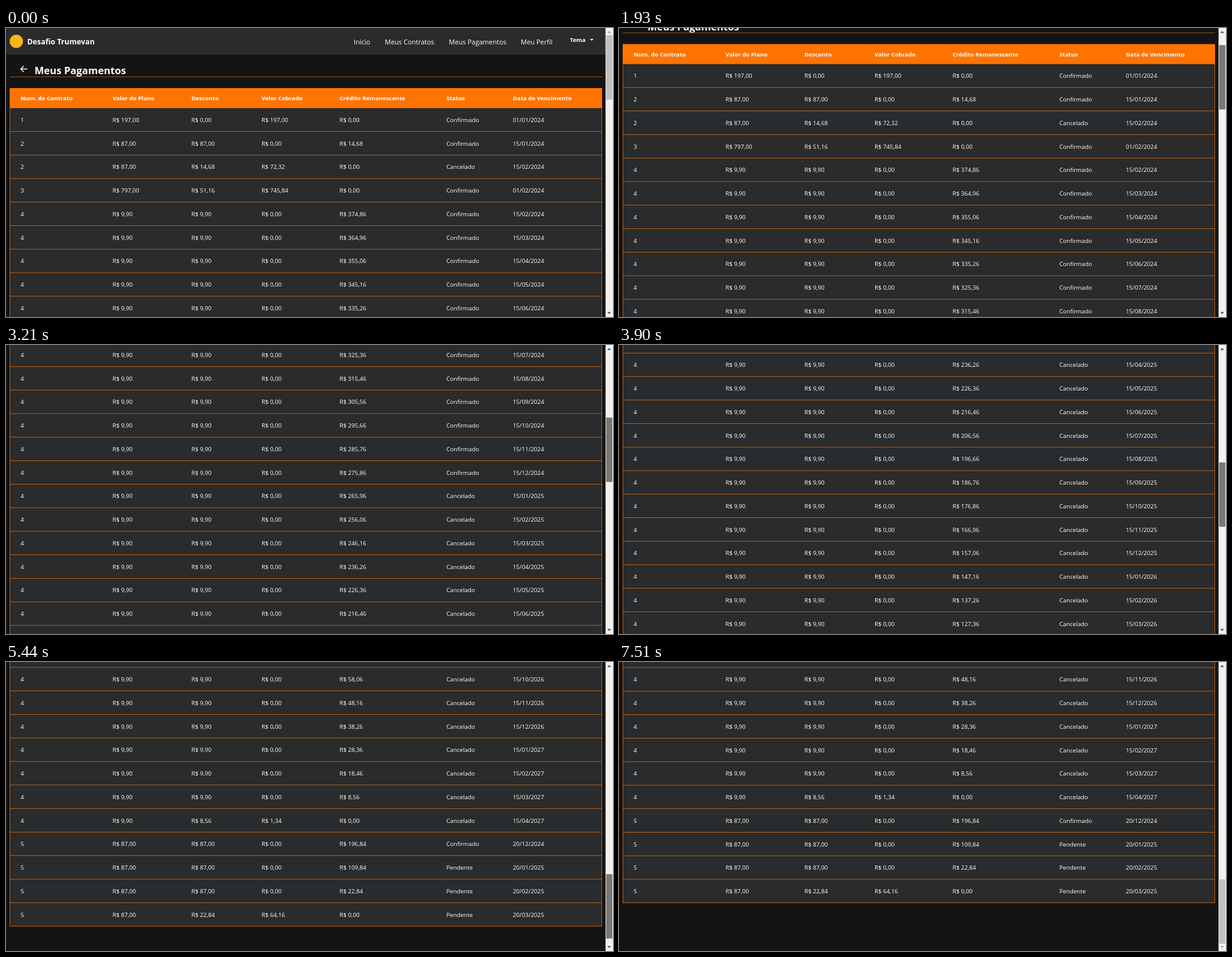
These frames come from a looping animation (1000 px wide and 476 px high, 7.53 s). An HTML page with a canvas:

```html
<!DOCTYPE html>
<html lang="pt-BR">
<head>
<meta charset="utf-8">
<title>Meus Pagamentos</title>
<style>
  html, body { margin: 0; width: 100%; height: 100%; overflow: hidden; background: #141414; }
  canvas { display: block; }
</style>
</head>
<body>
<canvas id="stage" width="1000" height="476"></canvas>
<script>
const ctx = document.getElementById('stage').getContext('2d');
const W = 1000, H = 476, LOOP = 7530, MAX_SCROLL = 1556.3;
const TABLE = { left: 6, right: 982, top: 99, body: 132, row: 38.75 };
const COLS = [24, 175.5, 305.5, 421, 549.5, 725.5, 835];
const HEADS = ['Num. do Contrato', 'Valor do Plano', 'Desconto', 'Valor Cobrado',
  'Crédito Remanescente', 'Status', 'Data de Vencimento'];
const FAMILY = '"Open Sans", "Noto Sans", sans-serif';
const LINE = '#de6c10', THIN = 0.8;

const money = v => 'R$ ' + v.toFixed(2).replace('.', ',');
const two = n => String(n).padStart(2, '0');
const date = (day, month) => `${two(day)}/${two(month % 12 + 1)}/${2024 + Math.floor(month / 12)}`;
const row = (id, plan, off, credit, status, due) =>
  [String(id), money(plan), money(off), money(plan - off), money(credit), status, due];

function buildRows() {
  const rows = [
    row(1, 197, 0, 0, 'Confirmado', date(1, 0)),
    row(2, 87, 87, 14.68, 'Confirmado', date(15, 0)),
    row(2, 87, 14.68, 0, 'Cancelado', date(15, 1)),
    row(3, 797, 51.16, 0, 'Confirmado', date(1, 1))
  ];
  let credit = 384.76;
  for (let m = 1; m < 40; m++) {
    const off = Math.min(9.9, credit);
    credit -= off;
    rows.push(row(4, 9.9, off, Math.abs(credit), m < 12 ? 'Confirmado' : 'Cancelado', date(15, m)));
  }
  credit = 283.84;
  for (let m = 11; m < 15; m++) {
    const off = Math.min(87, credit);
    credit -= off;
    rows.push(row(5, 87, off, credit, m < 12 ? 'Confirmado' : 'Pendente', date(20, m)));
  }
  return rows;
}
const ROWS = buildRows();

// [time, scroll, px per ms]
const PATH = [[1700, 0, 0.25], [1930, 72.5, 0.32], [2630, 300, 0.36],
  [3900, 816, 0.46], [4840, 1309.5, 0.52], [5810, MAX_SCROLL, 0]];
// [start, end, repaints]
const PACE = [[1700, 1930, 6], [1930, 2440, 13], [2440, 2630, 2],
  [2630, 3900, 13], [3900, 4840, 10], [4840, 5810, 10]];

function paintTime(t) {
  const p = PACE.find(([a, b]) => t >= a && t < b);
  if (!p) return t;
  const step = (p[1] - p[0]) / p[2];
  return p[0] + Math.floor((t - p[0]) / step) * step;
}

function scrollAt(t) {
  if (t <= 1700) return 0;
  if (t >= 5810) return MAX_SCROLL;
  t = paintTime(t);
  const i = PATH.findIndex((p, k) => t >= p[0] && t < PATH[k + 1][0]);
  const [t0, y0, v0] = PATH[i], [t1, y1, v1] = PATH[i + 1];
  const d = t1 - t0, u = (t - t0) / d, u2 = u * u, u3 = u2 * u;
  return (2 * u3 - 3 * u2 + 1) * y0 + (u3 - 2 * u2 + u) * d * v0 +
    (3 * u2 - 2 * u3) * y1 + (u3 - u2) * d * v1;
}

function box(x, y, w, h, color) {
  ctx.fillStyle = color;
  ctx.fillRect(x, y, w, h);
}

function text(str, x, y, size, weight = 400, color = '#fff') {
  ctx.font = `${weight} ${size}px ${FAMILY}`;
  ctx.fillStyle = color;
  ctx.fillText(str, x, y);
}

function triangle(x, y, w, h, color) {
  ctx.fillStyle = color;
  ctx.beginPath();
  ctx.moveTo(x - w / 2, y - h / 2);
  ctx.lineTo(x + w / 2, y - h / 2);
  ctx.lineTo(x, y + h / 2);
  ctx.fill();
}

function drawHeader() {
  box(0, 0, 988, 44, '#2a2b2d');
  ctx.fillStyle = '#fdb515';
  ctx.beginPath();
  ctx.arc(17, 22, 11, 0, Math.PI * 2);
  ctx.fill();
  text('Desafio Trumevan', 35, 27, 12.3, 700);
  text('Início', 573, 26.5, 11);
  text('Meus Contratos', 624, 26.5, 11);
  text('Meus Pagamentos', 729.5, 26.5, 11);
  text('Meu Perfil', 848, 26.5, 11);
  text('Tema', 929, 23, 9.6, 700);
  triangle(965, 19.5, 6, 3, '#fff');

  ctx.strokeStyle = '#fff';
  ctx.lineWidth = 1.4;
  ctx.beginPath();
  ctx.moveTo(35, 67.5);
  ctx.lineTo(24.5, 67.5);
  ctx.moveTo(29.3, 62.5);
  ctx.lineTo(24.3, 67.5);
  ctx.lineTo(29.3, 72.5);
  ctx.stroke();
  text('Meus Pagamentos', 47, 76, 16.5, 700);
  box(6, 80, 976, 1, '#98541d');
}

function drawTable(scroll) {
  const { left, right, top, body, row: h } = TABLE;
  const width = right - left, end = body + h * ROWS.length;
  box(left, body, width, end - body, '#292b2c');
  ROWS.forEach((cells, i) => {
    const y = body + i * h;
    if (y + h < scroll - 2 || y > scroll + H) return;
    const base = Math.round(y + 22.9 - scroll) + scroll;
    cells.forEach((c, k) => text(c, COLS[k], base, 9.7, 500));
    box(left, y + h - 0.65, width, THIN, LINE);
  });
  box(left + 0.1, body, THIN, end - body, LINE);
  box(right - 0.9, body, THIN, end - body, LINE);
  box(left, top, width, body - top, '#ff7300');
  HEADS.forEach((c, k) => text(c, COLS[k], 119, 9.6, 700));
}

function thumbColor(t) {
  if (t >= 1700 && t < 6600) return '#787878';
  return t >= 1440 && t < 7380 ? '#a8a8a8' : '#c1c1c1';
}

function drawScrollbar(t, scroll) {
  box(987.7, 0, 12.3, H, '#f1f1f1');
  triangle(993.7, 6.5, 6, -3.5, scroll > 0 ? '#505050' : '#a3a3a3');
  triangle(993.7, 469.5, 6, 3.5, scroll < MAX_SCROLL ? '#505050' : '#a3a3a3');
  box(988.7, 12 + scroll * 0.2223, 10.2, 106, thumbColor(t));
}

function draw(t) {
  const scroll = scrollAt(t);
  box(0, 0, W, H, '#141414');
  ctx.save();
  ctx.translate(0, -scroll);
  drawHeader();
  drawTable(scroll);
  ctx.restore();
  drawScrollbar(t, scroll);
}

const start = performance.now();
function tick() {
  draw((performance.now() - start) % LOOP);
  requestAnimationFrame(tick);
}
tick();
</script>
</body>
</html>
```
